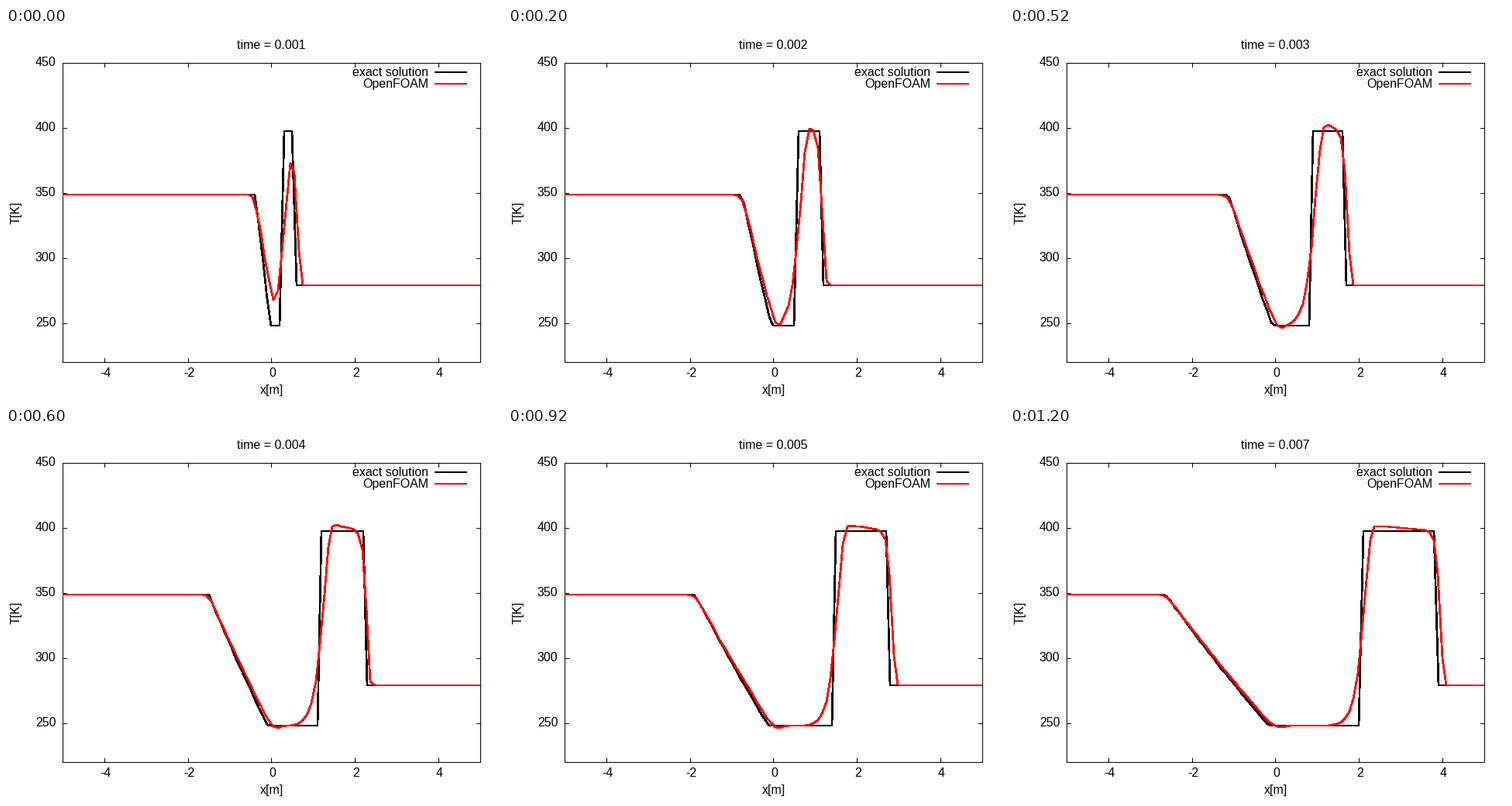
Recreate the animation shown at these times as a matplotlib script. Size 640 px wide and 480 px high, loop 1.4 s.

```python
import numpy as np
import matplotlib.pyplot as plt
from matplotlib.animation import FuncAnimation

W, H, DPI = 640, 480, 100
PX = 72 / DPI  # one pixel in points
LEFT, RIGHT, TOP, BOTTOM = 73, 612, 45, 431
STEPS, STEP_MS = 7, 200

# Shock tube states (K) and wave speeds (m per ms)
T_LEFT, T_FAN, T_SHOCK, T_RIGHT = 348.432, 247.75, 397.7, 278.746
SOUND, CONTACT_SPEED, SHOCK_SPEED = 0.37417, 0.29328, 0.55408

X_EXACT = np.linspace(-5, 5, 101)
X_SOLVER = np.linspace(-5, 5, 100)


def col(x):
    return LEFT + (x + 5) * (RIGHT - LEFT) / 10


def row(temp):
    return TOP + (450 - temp) * (BOTTOM - TOP) / 230


def fan(x, t):
    """Temperature through the expansion wave."""
    ratio = 5 / 6 - x / (6 * SOUND * t)
    return T_LEFT * np.clip(ratio, np.sqrt(T_FAN / T_LEFT), 1) ** 2


def exact(x, t):
    return np.select([x < CONTACT_SPEED * t, x < SHOCK_SPEED * t],
                     [fan(x, t), T_SHOCK], T_RIGHT)


def smeared_fan(x, t):
    """Expansion wave with soft corners, a late tail and a dip behind it."""
    x_late = x - 0.08 * np.clip(1 + x / (SOUND * t), 0, 1)
    offsets = np.linspace(-2.5, 2.5, 51)
    temp = np.average(fan(x_late[:, None] + 0.08 * offsets, t), axis=1,
                      weights=np.exp(-offsets ** 2 / 2))
    return temp - 7 / t * np.exp(-((x - 0.12) / 0.08) ** 2 / 2)


def fall(x, center, width):
    """Drop from 1 to 0 with a soft start and a sharp end."""
    return np.exp(-np.exp(np.clip((x - center) / width, -50, 50)))


def solver(x, t):
    contact, shock = CONTACT_SPEED * t, SHOCK_SPEED * t
    along = np.clip((x - contact) / (shock - contact), 0, 1)
    plateau = T_SHOCK + (2 + 20 / t) * (1 - along)
    temp = smeared_fan(x, t)
    temp += (plateau - temp) * (1 - fall(x, contact + 0.083, 0.14))
    return T_RIGHT + (temp - T_RIGHT) * fall(x, shock + 0.078, 0.061)


plt.rcParams["font.family"] = "Liberation Sans"
plt.rcParams["font.size"] = 16 * PX

fig = plt.figure(figsize=(W / DPI, H / DPI), dpi=DPI, facecolor="white")
ax = fig.add_axes([0, 0, 1, 1])
ax.set_xlim(-0.5, W - 0.5)
ax.set_ylim(H - 0.5, -0.5)
ax.axis("off")


def stroke(xs, ys, color="black", width=1.0, join="miter"):
    return ax.plot(xs, ys, color=color, lw=width * PX, antialiased=False,
                   snap=False, solid_capstyle="butt", solid_joinstyle=join)[0]


def label(x, y, text, ha="center", **kw):
    return ax.text(x, y + 0.5, text, ha=ha, va="baseline", color="black", **kw)


def set_curve(line, x, temp):
    line.set_data(np.round(col(x)) - 0.5, np.round(row(temp)) - 0.5)


stroke([LEFT, RIGHT, RIGHT, LEFT, LEFT], [TOP, TOP, BOTTOM, BOTTOM, TOP])
for temp in range(250, 451, 50):
    y = round(row(temp))
    label(64, y + 3, str(temp), "right")
    stroke([LEFT, LEFT + 5], [y, y])
    stroke([RIGHT - 5, RIGHT], [y, y])
for value in range(-4, 5, 2):
    x = round(col(value))
    label(x + 1, 449, str(value))
    stroke([x, x], [BOTTOM - 5, BOTTOM])
    stroke([x, x], [TOP, TOP + 5])

label(342, 471, "x[m]")
label(17.5, 237.5, "T[K]", rotation=90, rotation_mode="anchor")
title = label(297.5, 26, "", "left")
for y, name, color in [(57, "exact solution", "black"), (72, "OpenFOAM", "red")]:
    label(544.5, y + 4, name, "right")
    stroke([552.5, 594.5], [y - 0.5, y - 0.5], color, 2)

exact_line = stroke([], [], "black", 1.7, "round")
solver_line = stroke([], [], "red", 1.7, "round")


def draw(i):
    t = i + 1
    title.set_text(f"time = {t / 1000:.3f}")
    set_curve(exact_line, X_EXACT, exact(X_EXACT, t))
    set_curve(solver_line, X_SOLVER, solver(X_SOLVER, t))
    return title, exact_line, solver_line


anim = FuncAnimation(fig, draw, frames=STEPS, interval=STEP_MS,
                     repeat=True, repeat_delay=0)
plt.show()
```
